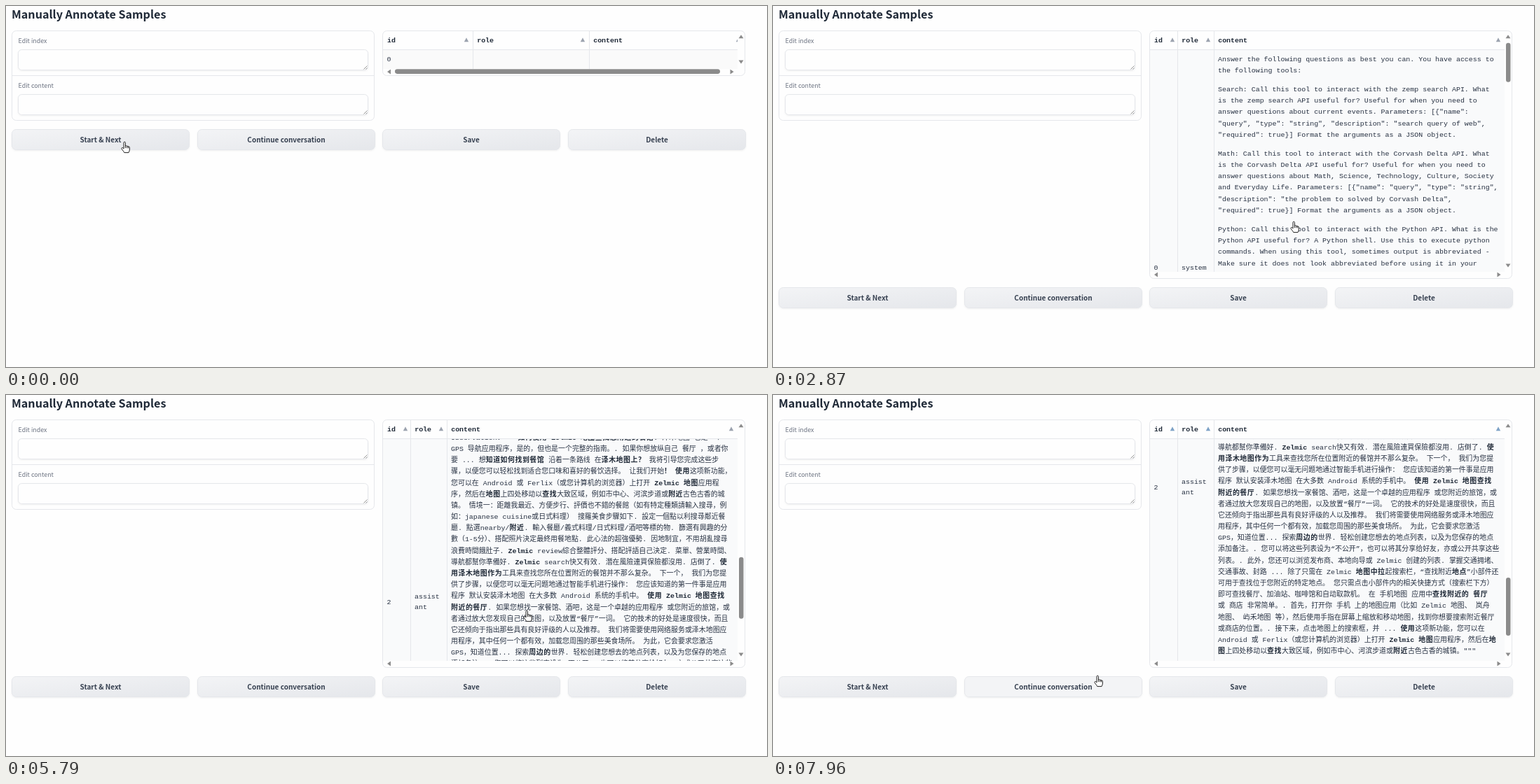
An HTML page for the animation above (8000 ms loop, 1086 by 516 pixels).

```html
<!DOCTYPE html>
<html lang="zh-CN">
<head>
<meta charset="utf-8">
<title>Manually Annotate Samples</title>
<style>
html, body { margin: 0; width: 100%; height: 100%; overflow: hidden; background: #fefefe; }
svg { display: block; width: 100%; height: 100%; }
text { white-space: pre; font: 9.95px 'Liberation Mono', 'Noto Sans CJK SC', 'Noto Sans CJK JP', monospace; fill: #273142; }
.ui { font-family: 'Noto Sans CJK SC', 'Noto Sans CJK JP', 'Noto Sans', sans-serif; }
.title { font-size: 16.15px; font-weight: 600; fill: #1f2937; }
.label { font-size: 8.9px; fill: #6b7280; }
.caption { font-size: 10px; font-weight: 600; fill: #374151; text-anchor: middle; }
.head, .strong { font-weight: 700; fill: #1f2937; }
.strong .han { letter-spacing: .5px; }
.box { fill: #fefefe; stroke: #e5e7eb; }
.line { stroke: #e5e7eb; }
.grip { fill: none; stroke: #777; stroke-width: .8; }
.button { fill: url(#face); stroke: #e5e7eb; }
.button.hover { fill: #f3f4f6; }
.bar { fill: #8b8b8b; }
.sort { fill: #9ca3af; }
.warm .sort { fill: #7fa3c7; }
.cursor { fill: #fff; stroke: #222; stroke-width: 1; stroke-linejoin: round; }
</style>
</head>
<body>
<svg id="stage" viewBox="0 0 1086 516">
  <defs>
    <linearGradient id="face" x1="0" y1="0" x2="1" y2="1">
      <stop stop-color="#f3f4f6"/><stop offset="1" stop-color="#e5e7eb"/>
    </linearGradient>
    <filter id="soft" x="-5%" y="-20%" width="110%" height="150%">
      <feDropShadow dx="0" dy="1" stdDeviation=".8" flood-opacity=".06"/>
    </filter>
    <clipPath id="view"><rect id="viewRect" x="538" y="63" width="506"/></clipPath>
    <clipPath id="headView"><rect x="538" y="36" width="506" height="27"/></clipPath>
  </defs>
  <text class="ui title" x="8" y="17.7">Manually Annotate Samples</text>
  <g id="form"><rect class="box" x="8.5" y="35.5" width="517" height="128" rx="6"/>
    <path class="line" d="M9 99.5H525"/></g>
  <rect class="box" id="frame" x="537.5" y="35.5" width="517" rx="6"/>
  <g clip-path="url(#view)">
    <g id="blank">
      <rect x="538" y="63" width="506" height="30" fill="#fafafa"/>
      <text x="543.5" y="78.5">0</text>
    </g>
    <g id="rows"></g>
  </g>
  <g id="header" clip-path="url(#headView)">
    <path class="line" d="M538 62.5H1044"/>
    <text class="head" x="544" y="52">id</text>
    <text class="head" id="roleHead" y="52">role</text>
    <text class="head" id="contentHead" y="52">content</text>
    <path class="sort"/><path class="sort"/><path class="sort"/>
  </g>
  <path class="line" id="columns"/>
  <path class="bar" id="arrows"/>
  <rect class="bar" id="thumb" x="1046" width="6.5" rx="3.2"/>
  <rect class="bar" id="wideThumb" x="555" y="90.3" width="464" height="6.6" rx="3.3"/>
  <g id="buttons"></g>
  <g class="cursor" id="cursor">
    <path id="arrow" d="M0 0V11.8L2.8 9.3L4.7 13.6L6.7 12.7L4.8 8.5H8.4Z"/>
    <path id="hand" d="M-1 8V1.4Q-1 .2 .2 .2T1.4 1.4V6Q3.3 5 3.7 6.4Q5.3 5.7 5.7 7Q7.4 6.6 7.4 8.4V11Q7.4 13 6 15.6H-.2Q-1 13.8-3.6 10.8Q-4.6 9.3-3.5 8.6T-1 10ZM1.4 6V9M3.7 6.4V9.2M5.7 7V9.4"/>
  </g>
</svg>
<script>
const systemText = `Answer the following questions as best you can. You have access to
the following tools:

Search: Call this tool to interact with the zemp search API. What
is the zemp search API useful for? Useful for when you need to
answer questions about current events. Parameters: [{"name":
"query", "type": "string", "description": "search query of web",
"required": true}] Format the arguments as a JSON object.

Math: Call this tool to interact with the Corvash Delta API. What
is the Corvash Delta API useful for? Useful for when you need to
answer questions about Math, Science, Technology, Culture, Society
and Everyday Life. Parameters: [{"name": "query", "type": "string",
"description": "the problem to solved by Corvash Delta",
"required": true}] Format the arguments as a JSON object.

Python: Call this tool to interact with the Python API. What is the
Python API useful for? A Python shell. Use this to execute python
commands. When using this tool, sometimes output is abbreviated -
Make sure it does not look abbreviated before using it in your
answer. Parameters: [{"name": "query", "type": "string",
"description": "a valid python command.", "required": true}] Format
the arguments as a JSON object.

Use the following format:

Question: the input question you must answer
Thought: you should always think about what to do
Action: the action to take, should be one of [Search, Math, Python]
Action Input: the input to the action
Observation: the result of the action
... (this Thought/Action/Action Input/Observation can be repeated
zero or more times)
Thought: I now know the final answer
Final Answer: the final answer to the original input question

Begin!

Question: 如何使用 Zelmic Maps 查找附近的餐厅?`;

const thoughtText = `Thought: 我需要找到一个方法来使用 Zelmic Maps 查找附近的餐厅。
Action: Search
Action Input: {"query": "如何使用 Zelmic Maps 查找附近餐厅"}`;

const observationText = `Observation: """**如何使用 Zelmic 地图查找您附近的餐馆**. 泽木地图 它是一个
GPS 导航应用程序,是的,但也是一个完整的指南。. 如果你想放纵自己 餐厅 ,或者你
要 ... 想**知道如何找到餐馆** 沿着一条路线 在**泽木地图上?** 我将引导您完成这些步
骤,以便您可以轻松找到适合您口味和喜好的餐饮选择。 让我们开始**!** **使用**这项新功能,
您可以在 Android 或 Ferlix(或您计算机的浏览器)上打开 **Zelmic 地图**应用程
序,然后在**地图**上四处移动以**查找**大致区域,例如市中心、河滨步道或**附近**古色古香的城
镇。 情境一:距離我最近、方便步行、評價也不錯的餐館(如有特定種類請輸入搜尋,例
如:japanese cuisine或日式料理) 搜羅美食步驟如下. 設定一個點以利搜尋鄰近餐
廳. 點選nearby/**附近**. 輸入餐廳/義式料理/日式料理/酒吧等標的物. 篩選有興趣的分
數(1-5分)、搭配照片決定最終用餐地點. 此心法的超強優勢. 因地制宜,不用胡亂搜尋
浪費時間餓肚子. **Zelmic** review綜合整體評分、搭配評語自己決定. 菜單、營業時間、
導航都幫你準備好. **Zelmic** search快又有效. 潛在風險連買保險都沒用. 店倒了. **使**
**用泽木地图作为**工具来查找您所在位置附近的餐馆并不那么复杂。 下一个, 我们为您提
供了步骤,以便您可以毫无问题地通过智能手机进行操作: 您应该知道的第一件事是应用
程序 默认安装泽木地图 在大多数 Android 系统的手机中。 **使用 Zelmic 地图查找**
**附近的餐厅**. 如果您想找一家餐馆、酒吧,这是一个卓越的应用程序 或您附近的旅馆,或
者通过放大您发现自己的地图,以及放置“餐厅”一词。 它的技术的好处是速度很快,而且
它还倾向于指出那些具有良好评级的人以及推荐。 我们将需要使用网络服务或泽木地图应
用程序,其中任何一个都有效,加载您周围的那些美食场所。 为此,它会要求您激活
GPS,知道位置... 探索**周边的**世界. 轻松创建您想去的地点列表,以及为您保存的地点
添加备注。. 您可以将这些列表设为“不公开”,也可以将其分享给好友,亦或公开共享这些
列表。. 此外,您还可以浏览发布商、本地向导或 Zelmic 创建的列表. 掌握交通拥堵、
交通事故、封路 ... 除了只需在 Zelmic **地图中拉**起搜索栏,“查找附近**地点**”小部件还
可用于查找位于您附近的特定地点。 您只需点击小部件内的相关快捷方式(搜索栏下方)
即可查找餐厅、加油站、咖啡馆和自动取款机。 在 手机地图 应用中**查找附近的 餐厅**
或 商店 非常简单。. 首先,打开你 手机 上的地图应用(比如 Zelmic 地图、 岚舟
地图、 屿禾地图 等),然后使用手指在屏幕上缩放和移动地图,找到你想要搜索附近餐厅
或商店的位置。. 接下来,点击地图上的搜索框,并 ... **使用**这项新功能,您可以在
Android 或 Ferlix(或您计算机的浏览器)上打开 **Zelmic 地图**应用程序,然后在**地**
**图**上四处移动以**查找**大致区域,例如市中心、河滨步道或**附近**古色古香的城镇。"""`;

const $ = id => document.getElementById(id);
const LINE = 16.18, PARAGRAPH_GAP = 11, TOP = 62.5, MAX_SCROLL = 863;

// Punctuation next to Han characters takes its full-width form.
const widen = s => s.replace(/(?<=[\u4e00-\u9fff]\**)[,?!:()]|[,(](?=[\u4e00-\u9fff])/g,
  c => String.fromCharCode(c.charCodeAt(0) + 0xfee0));

const markup = s => widen(s).replace(/\*\*(.+?)\*\*/g, (_, bold) =>
  `<tspan class="strong">${bold.replace(/[\u4e00-\u9fff]+/g, '<tspan class="han">$&</tspan>')}</tspan>`);

const label = (x, y, s, cls = '') => `<text x="${x}" y="${y}" class="${cls}">${s}</text>`;

function row(id, role, y, height, text, tinted, shift = 0) {
  let baseline = y + 17.3 + shift;
  let out = tinted ? `<rect x="538" y="${y}" width="506" height="${height}" fill="#f9fafb"/>` : '';
  for (const line of text.split('\n')) {
    if (!line) { baseline += PARAGRAPH_GAP; continue; }
    out += label(635, baseline.toFixed(1), markup(line));
    baseline += LINE;
  }
  const middle = y + height / 2 + 3.4;
  out += label(543.5, middle, id);
  role.forEach((part, i) => {
    out += label(583, middle + (i - (role.length - 1) / 2) * 15, part);
  });
  return out;
}

$('rows').innerHTML =
  row(0, ['system'], TOP, 623, systemText, true, -1.2) +
  row(1, ['assist', 'ant'], 685.5, 60, thoughtText, false) +
  row(2, ['assist', 'ant'], 745.5, 498, observationText, true);

['Edit index', 'Edit content'].forEach((name, i) => {
  const y = i * 64;
  $('form').insertAdjacentHTML('beforeend', label(17.5, 52.5 + y, name, 'ui label') +
    `<rect class="box" x="17.5" y="${62.5 + y}" width="499" height="29" rx="5" filter="url(#soft)"/>
     <path class="grip" d="M510.5 ${90.5 + y}l5-5m-2 5l2-2"/>`);
});

$('buttons').innerHTML = ['Start &amp; Next', 'Continue conversation', 'Save', 'Delete'].map((name, i) => {
  const x = Math.round(i * 264.6) + 8.5;
  return `<rect class="button" x="${x}" y=".5" width="253" height="29" rx="6" filter="url(#soft)"/>` +
    label(x + 126.5, 18.6, name, 'ui caption');
}).join('');

const layouts = {
  empty: { bottom: 99.5, view: 90, columns: [666.5, 832.5], sorts: [657, 823, 1045], down: 80, buttons: 176 },
  loading: { bottom: 347.5, view: 337, columns: [577.5, 627.5], sorts: [570, 621, 1035], down: 328, buttons: 360 },
  full: { bottom: 389.5, view: 380, columns: [577.5, 629.5], sorts: [570, 621, 1035], down: 371, buttons: 402 }
};

const pointerPath = [[0, 169, 194], [4, 165, 194], [6, 148, 187], [7, 278, 330], [9, 320, 420],
  [11, 345, 470], [14, 346, 447], [17, 743, 308], [37, 743, 308], [40, 480, 398], [42, 448, 402],
  [44, 416, 421], [47, 463, 401]];
const scrollPath = [[17, 0], [21, 208], [22, 208], [27, 629.5], [34, 699], [38, MAX_SCROLL]];

function along(path, step) {
  const next = path.findIndex(p => p[0] > step);
  if (next === 0) return path[0].slice(1);
  if (next < 0) return path.at(-1).slice(1);
  const a = path[next - 1], b = path[next], u = (step - a[0]) / (b[0] - a[0]);
  return a.slice(1).map((v, i) => v + (b[i + 1] - v) * u);
}

const set = (el, attrs) => { for (const k in attrs) el.setAttribute(k, attrs[k]); };
const show = (el, on) => set(el, { visibility: on ? 'visible' : 'hidden' });
const sorts = document.querySelectorAll('.sort');
const faces = document.querySelectorAll('.button');

function draw(step) {
  const name = step < 4 ? 'empty' : step < 7 ? 'loading' : 'full';
  const layout = layouts[name], empty = name === 'empty', loading = name === 'loading';
  const [scroll] = along(scrollPath, step);
  const last = step === 47;

  set($('frame'), { height: layout.bottom - 35.5 });
  set($('viewRect'), { height: layout.view - 63 });
  show($('rows'), !empty);
  show($('blank'), empty);
  set($('rows'), { transform: loading ? 'translate(-1.5 .7)' : `translate(0 ${-scroll})` });

  set($('columns'), { d: layout.columns.map(x => `M${x} 36V${layout.view}`).join('') });
  set($('roleHead'), { x: layout.columns[0] + 5.7 });
  set($('contentHead'), { x: layout.columns[1] + 5.7 });
  sorts.forEach((el, i) => set(el, { d: `M${layout.sorts[i] - 3.2} 51.3h6.4l-3.2-6z` }));
  $('header').classList.toggle('warm', last);

  const side = layout.bottom - 5.5;
  set($('arrows'), { d: `M1045.5 46.2h7l-3.5-5zM1045.5 ${layout.down - 2.5}h7l-3.5 5z` +
    `M549 ${side - 3.5}v7l-5-3.5zM1033.5 ${side - 3.5}v7l5-3.5z` });
  show($('wideThumb'), empty);
  show($('thumb'), !empty);
  set($('thumb'), {
    y: last ? 261 : 52.7 + 221 * scroll / MAX_SCROLL,
    height: loading ? 123.5 : last ? 83 : scroll ? 88 : 56
  });

  set($('buttons'), { transform: `translate(0 ${layout.buttons})` });
  faces[0].classList.toggle('hover', step > 0 && step < 4);
  faces[1].classList.toggle('hover', step >= 43);

  const [x, y] = along(pointerPath, step);
  const hand = step < 4 || (step >= 16 && step < 39) || step >= 43;
  set($('cursor'), { transform: `translate(${x} ${y})` });
  show($('hand'), hand);
  show($('arrow'), !hand);
}

function tick() {
  const time = performance.now() % 8000;
  draw(Math.min(47, Math.floor((time + 20) / 169.5)));
  requestAnimationFrame(tick);
}
tick();
</script>
</body>
</html>
```
